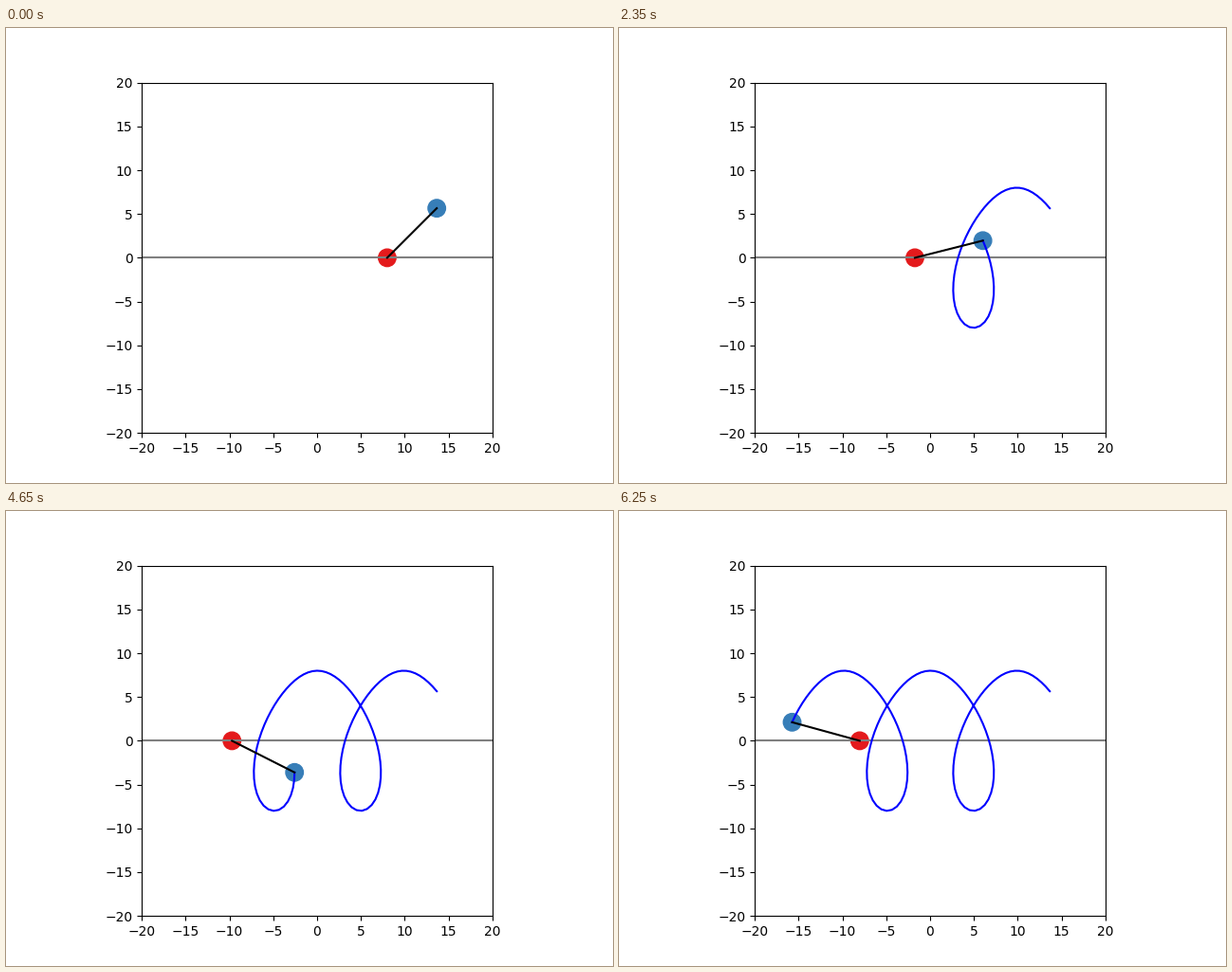
A matplotlib script that plays this animation: 640x480 px, repeating every 6300 ms.

```python
import numpy as np
import matplotlib.pyplot as plt
from matplotlib.animation import FuncAnimation
from matplotlib.patches import Circle

STEPS, DT, SUB = 126, 0.05, 20
G, L = 9.81, 8.0
RED, BLUE = "#e41a1c", "#377eb8"


def deriv(s):
    """Rates of (cart x, cart speed, rod angle, rod spin), equal masses."""
    _, v, th, w = s
    c, sn = np.cos(th), np.sin(th)
    d = 1 + c * c
    acc = c * (L * w * w + G * sn) / d
    spin = (L * w * w * sn * c - 2 * G * c) / (L * d)
    return np.array([v, acc, w, spin])


def rk4(s, h):
    a = deriv(s)
    b = deriv(s + h / 2 * a)
    c = deriv(s + h / 2 * b)
    d = deriv(s + h * c)
    return s + h / 6 * (a + 2 * b + 2 * c + d)


def simulate():
    s = np.array([8.0, 2.0, np.pi / 4, 2.0])
    states = [s]
    for _ in range(STEPS - 1):
        for _ in range(SUB):
            s = rk4(s, DT / SUB)
        states.append(s)
    return np.array(states)


path = simulate()
cart_x = path[:, 0]
bob_x = cart_x + L * np.cos(path[:, 2])
bob_y = L * np.sin(path[:, 2])

fig = plt.figure(figsize=(6.4, 4.8), dpi=100)
ax = fig.add_subplot(111, aspect="equal", xlim=(-20, 20), ylim=(-20, 20))
ax.set_xticks(range(-20, 21, 5))
ax.set_yticks(range(-20, 21, 5))

cart = ax.add_patch(Circle((0, 0), 1, color=RED))
bob = ax.add_patch(Circle((0, 0), 1, color=BLUE))
ax.axhline(0, color="gray", lw=1.5)
trail, = ax.plot([], [], color="blue", lw=1.5)
rod, = ax.plot([], [], color="black", lw=1.5)


def draw(i):
    cart.center = cart_x[i], 0
    bob.center = bob_x[i], bob_y[i]
    rod.set_data([cart_x[i], bob_x[i]], [0, bob_y[i]])
    trail.set_data(bob_x[:i + 1], bob_y[:i + 1])
    return cart, bob, trail, rod


anim = FuncAnimation(fig, draw, frames=STEPS, init_func=lambda: draw(0),
                     interval=50, repeat=True, repeat_delay=0)
plt.show()
```
